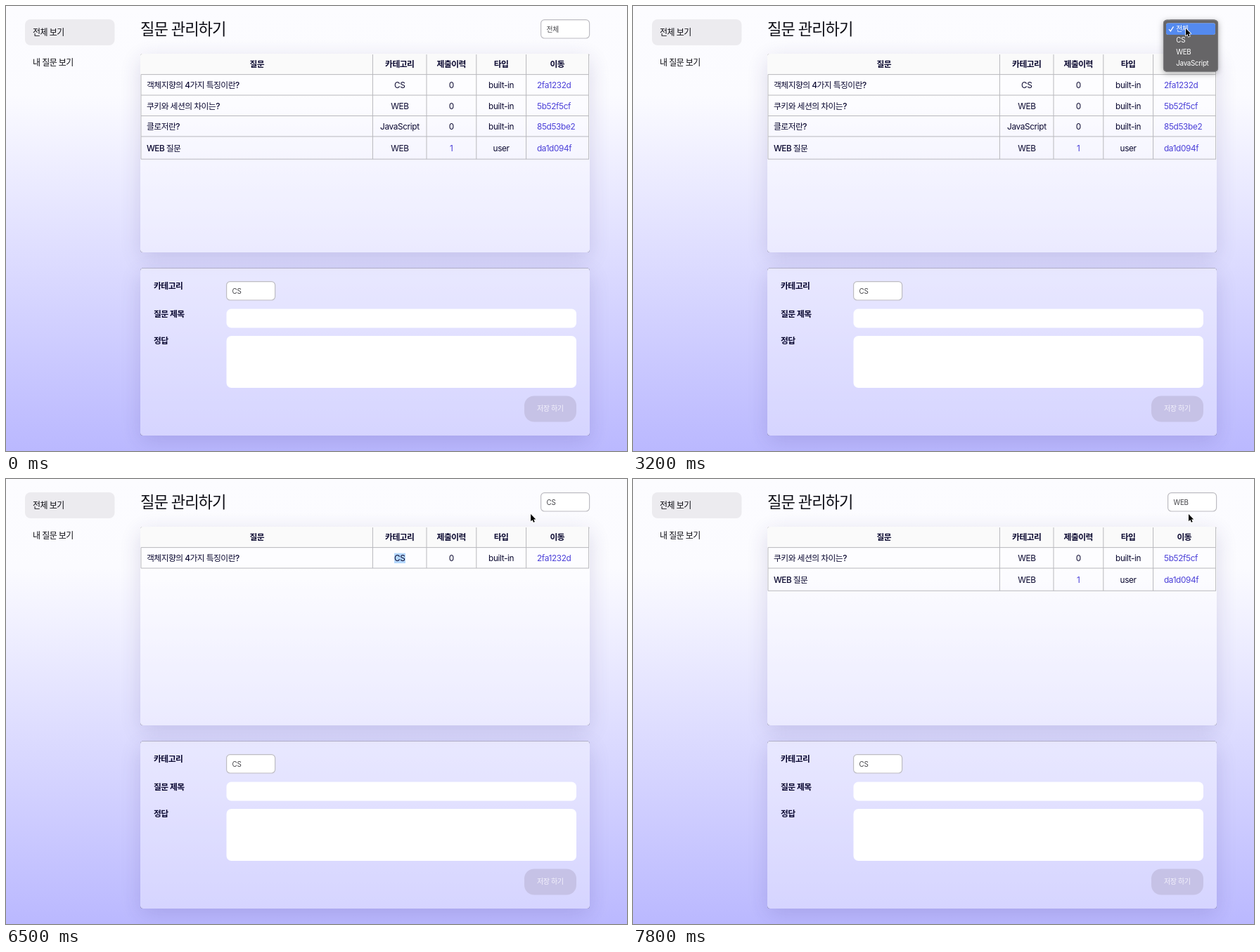
Write an HTML page with a canvas that moves like this. It is 883x634 px and loops after 8 s.

```html
<!DOCTYPE html>
<html lang="ko">
<head>
<meta charset="utf-8">
<title>질문 관리하기</title>
<style>
html, body { margin: 0; width: 100%; height: 100%; overflow: hidden; background: #fcfcff; }
canvas { display: block; width: 883px; height: 634px; }
</style>
</head>
<body>
<canvas id="stage"></canvas>
<script>
const W = 883, H = 634, LOOP = 8000, STEP = 100;
const FAMILY = 'Inter, "Noto Sans CJK KR", "Noto Sans CJK JP", "Noto Sans CJK", sans-serif';
const INK = '#0a0830', LINK = '#4a3fd8', LINE = '#b9b9bd', SELECTED = '#b3d7fe';
const canvas = document.getElementById('stage');
const dpr = window.devicePixelRatio || 1;
canvas.width = Math.round(W * dpr);
canvas.height = Math.round(H * dpr);
const c = canvas.getContext('2d');

const QUESTIONS = [
  ['객체지향의 4가지 특징이란?', 'CS', '0', 'built-in', '2fa1232d'],
  ['쿠키와 세션의 차이는?', 'WEB', '0', 'built-in', '5b52f5cf'],
  ['클로저란?', 'JavaScript', '0', 'built-in', '85d53be2'],
  ['WEB 질문', 'WEB', '1', 'user', 'da1d094f']
];
const OPTIONS = ['전체', 'CS', 'WEB', 'JavaScript'];
const COLUMNS = [
  { head: '질문', mid: 357, left: 200 },
  { head: '카테고리', mid: 560 },
  { head: '제출이력', mid: 633.5 },
  { head: '타입', mid: 704.3 },
  { head: '이동', mid: 784, left: 755 }
];
const LABELS = [['카테고리', 399], ['질문 제목', 438.5], ['정답', 477]];

// Pointer path: time, x, y
const PATH = [
  [100, 838, 562], [500, 42, 24], [900, 543, 145], [1100, 543, 118],
  [1200, 543, 118], [1400, 560, 162], [1800, 567, 474], [2000, 567, 474],
  [2100, 567, 488], [2200, 567, 482], [2800, 822, 110], [3100, 786, 32],
  [3400, 786, 32], [3900, 784, 51], [4900, 784, 51], [5500, 553, 113],
  [5600, 553, 113], [5800, 589, 115], [6000, 589, 115], [6700, 785, 34],
  [7000, 784, 54], [7100, 784, 59], [7300, 784, 54], [7500, 784, 54],
  [7800, 790, 50], [8000, 790, 50]
];

const within = (t, a, b) => t >= a && t < b;
const ease = u => u * u * (3 - 2 * u);

function pointerAt(t) {
  const i = PATH.findIndex(p => p[0] > t) - 1;
  const [t0, x0, y0] = PATH[i], [t1, x1, y1] = PATH[i + 1];
  const k = ease((t - t0) / (t1 - t0));
  return { x: x0 + (x1 - x0) * k, y: y0 + (y1 - y0) * k };
}

function round(x, y, w, h, r, path = new Path2D()) {
  path.roundRect(x, y, w, h, r);
  return path;
}

function box(x, y, w, h, r, fill, border) {
  const p = round(x, y, w, h, r);
  c.fillStyle = fill;
  c.fill(p);
  if (border) {
    c.strokeStyle = border;
    c.lineWidth = 1.2;
    c.stroke(p);
  }
}

// Shadow outside a box only, so translucent boxes stay clean
function shadow(x, y, w, h, r, dy, blur, color) {
  const outside = new Path2D();
  outside.rect(0, 0, W, H);
  round(x, y, w, h, r, outside);
  c.save();
  c.clip(outside, 'evenodd');
  c.shadowColor = color;
  c.shadowBlur = blur * dpr;
  c.shadowOffsetY = dy * dpr;
  c.fillStyle = '#000';
  c.fill(round(x, y, w, h, r));
  c.restore();
}

// Draws text centred on y; returns its left edge and width
function text(str, x, y, { size = 11.8, weight = 400, color = INK, align = 'left', mark } = {}) {
  const hangul = /[가-힣]/.test(str);
  const gap = (hangul ? -0.045 : -0.03) * size;
  c.font = `${hangul && weight < 500 ? 500 : weight} ${size}px ${FAMILY}`;
  c.letterSpacing = gap + 'px';
  const w = c.measureText(str).width - gap;
  const left = align === 'center' ? x - w / 2 : x;
  if (mark !== undefined) {
    c.fillStyle = SELECTED;
    c.fillRect(left, y - 7.2, w + mark, 14.4);
  }
  c.fillStyle = color;
  c.fillText(str, left, y + size * 0.37);
}

function select(x, y, value) {
  box(x + 0.6, y + 0.6, 69, 26.4, 5, '#fff', '#bdbcc2');
  text(value, x + 8.6, y + 14, { size: 9.8, color: '#444448' });
}

function background() {
  const g = c.createLinearGradient(0, 0, 0, H);
  g.addColorStop(0, '#fcfcff');
  g.addColorStop(0.2, '#fbfbff');
  g.addColorStop(1, '#bab8ff');
  c.fillStyle = g;
  c.fillRect(0, 0, W, H);
}

function card(y, h) {
  shadow(191, y, 639, h, 4, 8, 30, 'rgba(50,40,120,.16)');
  box(191, y, 639, h, 4, 'rgba(255,255,255,.37)');
}

function table(filter, markOf) {
  const top = 97.6, lines = [192, 521.4, 598, 668.8, 739.6, 828.6];
  box(191, 68, 639, top - 68, [4, 4, 0, 0], '#fafafa');
  COLUMNS.forEach(col => text(col.head, col.mid, 83, { weight: 700, align: 'center' }));
  let y = top, cell = 0;
  const rules = [y];
  QUESTIONS.filter(q => filter === '전체' || q[1] === filter).forEach(q => {
    const h = q[3] === 'user' ? 32.2 : 29.45;
    q.forEach((str, i) => {
      const col = COLUMNS[i];
      const isLink = i === 4 || (i === 2 && q[3] === 'user');
      text(str, col.left || col.mid, y + h / 2 + 0.5, {
        align: col.left ? 'left' : 'center',
        color: isLink ? LINK : INK,
        mark: markOf(cell++)
      });
    });
    y += h;
    rules.push(y);
  });
  c.fillStyle = LINE;
  rules.forEach(r => c.fillRect(192, r - 0.5, 637, 1));
  lines.forEach((x, i) => {
    const from = i ? 69 : top;
    c.fillRect(x - 0.5, from, 1, y - from);
  });
}

function form(markOf) {
  card(373.5, 238.5);
  LABELS.forEach(([str, y], i) => text(str, 210, y, { weight: 700, mark: markOf(20 + i) }));
  select(313, 392, 'CS');
  box(313.5, 431.5, 497.5, 27, 7, '#fff');
  box(313.5, 470, 497.5, 74, 7, '#fff');
  box(737, 555.5, 74, 37, 14, '#c6c2e6');
  text('저장 하기', 774, 573.5, { size: 10.1, color: '#f3f1fc', align: 'center' });
}

function menu(checked, hover, alpha) {
  const row = 16.3, x = 754, y = 19.8 - checked * row, w = 78, h = 74;
  const mid = i => y + 12.7 + i * row;
  c.save();
  c.globalAlpha = alpha;
  shadow(x, y, w, h, 5, 2, 8, 'rgba(0,0,0,.32)');
  const body = round(x, y, w, h, 5);
  if (hover >= 0) {
    const bar = [758, mid(hover) - 8.2, 70, 16.6, 3];
    round(...bar, body);
    box(...bar, '#548aef');
  }
  c.fillStyle = '#666567';
  c.fill(body, 'evenodd');
  c.lineWidth = 0.8;
  c.strokeStyle = '#858487';
  c.stroke(round(x + 0.4, y + 0.4, w - 0.8, h - 0.8, 5));
  OPTIONS.forEach((o, i) => text(o, 772.3, mid(i), { size: 9.8, color: '#fff' }));
  const m = mid(checked);
  c.beginPath();
  c.moveTo(762, m + 0.6);
  c.lineTo(764.3, m + 3.4);
  c.lineTo(768.5, m - 3.2);
  c.lineWidth = 1.3;
  c.strokeStyle = '#fff';
  c.stroke();
  c.restore();
}

function arrow(x, y) {
  const p = new Path2D('M0 0V10.2L2.3 8.1L3.9 11.8L5.7 11L4.1 7.4H7.2Z');
  c.save();
  c.translate(x, y);
  c.lineJoin = 'round';
  c.lineWidth = 1.6;
  c.strokeStyle = '#fff';
  c.stroke(p);
  c.fillStyle = '#000';
  c.fill(p);
  c.restore();
}

function beam(x, y) {
  const p = new Path2D('M-2.6 -6Q0 -6 0 -4.4Q0 -6 2.6 -6M0 -4.4V4.4M-2.6 6Q0 6 0 4.4Q0 6 2.6 6');
  c.save();
  c.translate(x, y);
  c.strokeStyle = '#fff';
  c.lineWidth = 2.2;
  c.stroke(p);
  c.strokeStyle = '#222';
  c.lineWidth = 1;
  c.stroke(p);
  c.restore();
}

// Number of text cells, in reading order, that a drag down to y reaches
function reach(y) {
  if (y < 157) return 6;
  if (y < 190) return 11;
  return 20 + LABELS.filter(l => y > l[1] - 10).length;
}

function marker(t, pointer) {
  if (within(t, 1300, 2100)) {
    const end = reach(pointer.y);
    return i => i >= 1 && i < end ? (i === end - 1 ? 0 : 2) : undefined;
  }
  if (within(t, 5700, 7700)) return i => i === 1 ? 0 : undefined;
  return () => undefined;
}

function drawMenu(t, y) {
  const first = within(t, 3200, 4700), second = within(t, 6800, 7800);
  if (!first && !second) return;
  const checked = first ? 0 : 1;
  const since = t - (first ? 4300 : 7500);
  const alpha = since < 200 ? 1 : since < 300 ? 0.47 : 0.12;
  const blink = since === 0 && first || since === 100 && second;
  const hover = Math.floor((y - 24.3) / 16.3) + checked;
  menu(checked, blink ? -1 : hover, alpha);
}

function draw(t) {
  c.setTransform(dpr, 0, 0, dpr, 0, 0);
  const pointer = t >= 100 ? pointerAt(t) : { x: -50, y: -50 };
  const filter = t < 4600 ? '전체' : t < 7700 ? 'CS' : 'WEB';
  const markOf = marker(t, pointer);
  background();
  box(27, 19, 127.5, 37, 8, '#ecebef');
  text('전체 보기', 38, 37.5, { size: 12, weight: 500, color: '#0c0c12' });
  text('내 질문 보기', 38, 80.5, { size: 12, weight: 500, color: '#0c0c12' });
  text('질문 관리하기', 191, 32.5, { size: 22.2, weight: 500, color: '#0c0c14' });
  card(68, 283);
  table(filter, markOf);
  form(markOf);
  select(760, 19, filter);
  drawMenu(t, pointer.y);
  const overText = within(t, 900, 1300) || within(t, 2100, 2300) || within(t, 5400, 6200);
  (overText ? beam : arrow)(pointer.x, pointer.y);
}

const start = performance.now();
function tick() {
  const t = (performance.now() - start) % LOOP;
  draw(Math.floor(t / STEP) * STEP);
  requestAnimationFrame(tick);
}
tick();
</script>
</body>
</html>
```
